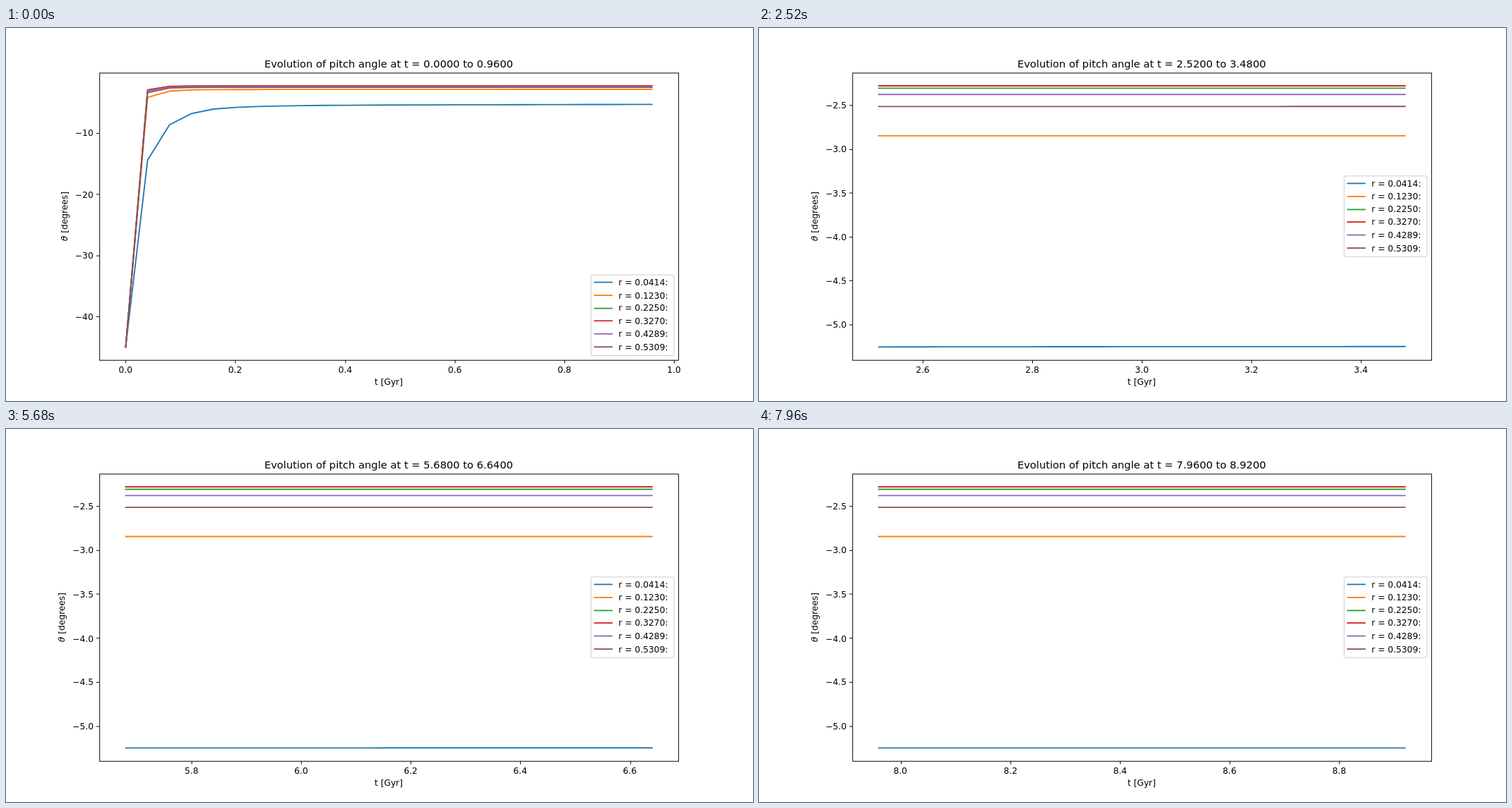
Recreate the animation shown at these times as an HTML page with a canvas. Size 1058x529 px, loop 8000 ms.

```html
<!DOCTYPE html>
<html lang="en">
<head>
<meta charset="utf-8">
<title>Evolution of pitch angle</title>
<style>
  html, body { margin: 0; width: 100%; height: 100%; overflow: hidden; background: #fff; }
  canvas { display: block; width: 1058px; height: 529px; }
</style>
</head>
<body>
<canvas id="stage" width="1058" height="529"></canvas>
<script>
const ctx = document.getElementById('stage').getContext('2d');

// The chart is laid out on a 1200 x 600 figure at 100 dpi.
const FIG_W = 1200, FIG_H = 600;
const pt = n => n * 100 / 72;
const EM = pt(10);
const AXES = { left: 150, right: 1080, top: 72, bottom: 534 };
const MID_X = (AXES.left + AXES.right) / 2;
const MID_Y = (AXES.top + AXES.bottom) / 2;
const MARGIN = 1 / 22;
const STEP = 0.04, POINTS = 25, FRAME_MS = 40, FRAMES = 200;

// early: first samples; afterwards limit + slow and fast decays.
const CURVES = [
  { r: '0.0414', color: '#1f77b4', early: [45, 14.42, 8.66, 6.82, 6.09, 5.81], limit: 5.251, slow: 0.106, rate: 1.71, fast: 0.16 },
  { r: '0.1230', color: '#ff7f0e', early: [45, 4.18, 3.15, 2.94], limit: 2.8497, slow: 0.0125, rate: 1.71, fast: 0.004 },
  { r: '0.2250', color: '#2ca02c', early: [45, 3.04, 2.41, 2.325], limit: 2.308, slow: 0.0003, rate: 1.7, fast: 0.001 },
  { r: '0.3270', color: '#d62728', early: [45, 2.92, 2.36, 2.292], limit: 2.2807, slow: 0.0001, rate: 1.7, fast: 0.001 },
  { r: '0.4289', color: '#9467bd', early: [45, 3.12, 2.49, 2.395], limit: 2.379, slow: 0.0003, rate: 1.7, fast: 0.001 },
  { r: '0.5309', color: '#8c564b', early: [45, 3.38, 2.64, 2.54], limit: 2.516, slow: 0.002, rate: 1.1, fast: 0.001 }
];

function pitch(curve, n) {
  if (n < curve.early.length) return -curve.early[n];
  const slow = curve.slow * Math.exp(-curve.rate * (n * STEP - 0.76));
  return -(curve.limit + slow + curve.fast * 0.55 ** (n - 6));
}

function niceStep(range) {
  const raw = range / 9;
  const base = 10 ** Math.floor(Math.log10(raw));
  return base * [1, 2, 2.5, 5, 10].find(m => m * base >= raw - 1e-9);
}

function ticks(lo, hi) {
  const step = niceStep(hi - lo), list = [];
  for (let k = Math.ceil(lo / step); k * step <= hi; k++) {
    const value = k * step;
    const label = Math.abs(value).toFixed(step < 0.99 ? 1 : 0);
    list.push({ value, label: (value < -1e-9 ? '\u2212' : '') + label });
  }
  return list;
}

const crisp = v => Math.floor(v + 0.5) + 0.5;

function font(size, style = '') {
  ctx.font = `${style} ${size}px "DejaVu Sans", sans-serif`;
}

function text(str, x, y, align = 'left') {
  ctx.fillStyle = '#000';
  ctx.textAlign = 'left';
  const w = ctx.measureText(str).width;
  const shift = align === 'center' ? w / 2 : align === 'right' ? w : 0;
  ctx.fillText(str, Math.round(x - shift), Math.round(y));
}

function stroke(points, color, width, cap = 'butt') {
  ctx.beginPath();
  for (const [x, y] of points) ctx.lineTo(x, y);
  ctx.strokeStyle = color;
  ctx.lineWidth = width;
  ctx.lineCap = cap;
  ctx.lineJoin = 'round';
  ctx.stroke();
}

function drawCurve(points, color) {
  const flat = points.every((p, i) => !i || Math.abs(p[1] - points[i - 1][1]) < 1e-4);
  const path = flat ? points.map(([x, y]) => [x, Math.round(y)]) : points;
  stroke(path, color, pt(1.5), 'square');
}

function drawYLabel(baseline) {
  const rest = ' [degrees]';
  ctx.save();
  ctx.translate(baseline, MID_Y);
  ctx.rotate(-Math.PI / 2);
  ctx.fillStyle = '#000';
  font(EM);
  const restW = ctx.measureText(rest).width;
  font(EM, 'italic');
  const thetaW = ctx.measureText('\u03b8').width;
  const x = -(thetaW + restW) / 2;
  ctx.fillText('\u03b8', x, 0);
  font(EM);
  ctx.fillText(rest, x + thetaW, 0);
  ctx.restore();
}

function drawLegend(top) {
  ctx.beginPath();
  ctx.roundRect(940, top, 133, 130, 2.78);
  ctx.fillStyle = 'rgba(255,255,255,0.8)';
  ctx.fill();
  ctx.strokeStyle = 'rgba(204,204,204,0.8)';
  ctx.lineWidth = pt(1);
  ctx.stroke();
  CURVES.forEach((curve, i) => {
    const baseline = top + 16.6 + 20.9 * i;
    const y = Math.round(baseline - 0.35 * EM);
    stroke([[945.6, y], [973.4, y]], curve.color, pt(1.5), 'square');
    text(`r = ${curve.r}:`, 984, baseline);
  });
}

function draw(frame) {
  const start = frame * STEP, end = start + (POINTS - 1) * STEP;
  const rows = CURVES.map(c => Array.from({ length: POINTS }, (_, i) => pitch(c, frame + i)));
  const all = rows.flat();
  const min = Math.min(...all), max = Math.max(...all);
  const padX = (end - start) / 20, padY = (max - min) / 20;
  const width = AXES.right - AXES.left, height = AXES.bottom - AXES.top;
  const toX = t => AXES.left + width * (MARGIN + (t - start) / (end - start) * (1 - 2 * MARGIN));
  const toY = v => AXES.top + height * (MARGIN + (max - v) / (max - min) * (1 - 2 * MARGIN));

  ctx.setTransform(1058 / FIG_W, 0, 0, 529 / FIG_H, 0, 0);
  ctx.fillStyle = '#fff';
  ctx.fillRect(0, 0, FIG_W, FIG_H);

  font(EM);
  for (const { value, label } of ticks(start - padX, end + padX)) {
    const x = toX(value);
    stroke([[crisp(x), AXES.bottom], [crisp(x), AXES.bottom + pt(3.5) + 0.5]], '#000', pt(0.8));
    text(label, x, 555, 'center');
  }

  let labelW = 0;
  for (const { value, label } of ticks(min - padY, max + padY)) {
    const y = toY(value);
    stroke([[AXES.left - pt(3.5), crisp(y)], [AXES.left, crisp(y)]], '#000', pt(0.8));
    text(label, AXES.left - pt(7), y + 5.4, 'right');
    labelW = Math.max(labelW, ctx.measureText(label).width);
  }

  rows.forEach((row, i) => {
    drawCurve(row.map((v, k) => [toX(start + k * STEP), toY(v)]), CURVES[i].color);
  });

  ctx.strokeStyle = '#000';
  ctx.lineWidth = pt(0.8);
  ctx.lineJoin = 'miter';
  ctx.strokeRect(AXES.left + 0.5, AXES.top + 0.5, width, height);

  text('t [Gyr]', MID_X, 574, 'center');
  drawYLabel(Math.round(AXES.left - pt(7) - labelW - 12.2));
  font(pt(12));
  text(`Evolution of pitch angle at t = ${start.toFixed(4)} to ${end.toFixed(4)}`, MID_X, 64, 'center');

  // The legend sits in the lower corner while the first curve leaves it free.
  font(EM);
  const lowerFree = toY(rows[0][POINTS - 1]) < 395;
  drawLegend(lowerFree ? 397 : 238);
}

function tick() {
  draw(Math.floor(performance.now() / FRAME_MS) % FRAMES);
  requestAnimationFrame(tick);
}
tick();
</script>
</body>
</html>
```
